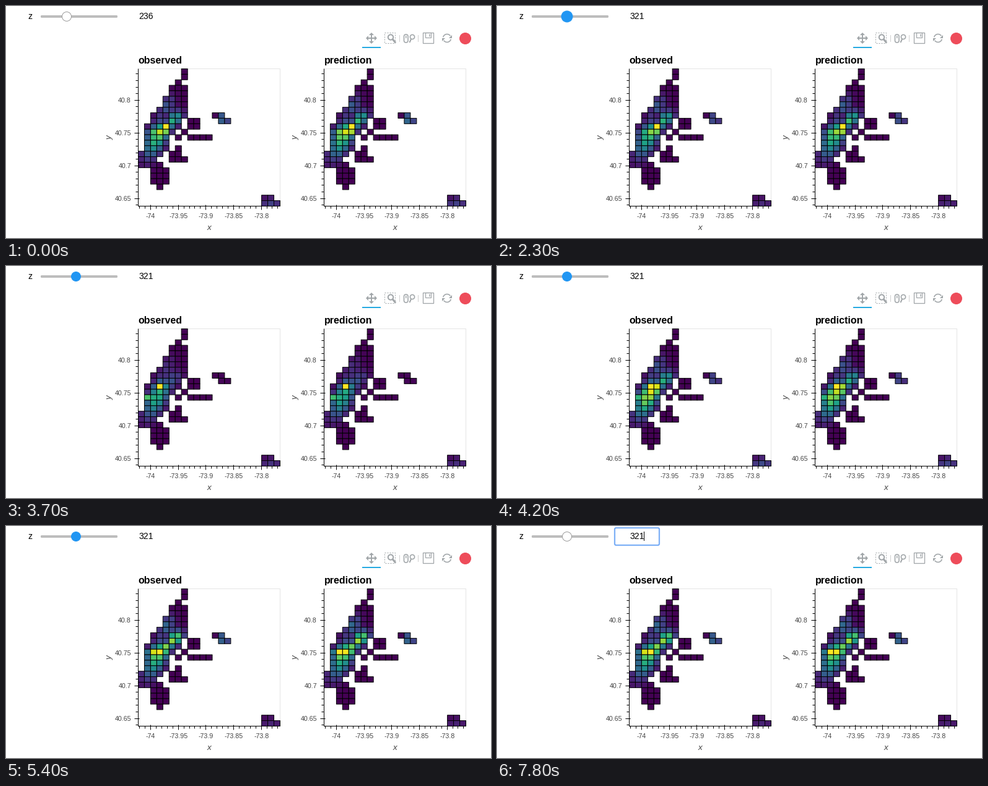
A matplotlib script that plays this animation: 783x375 px, repeating every 8000 ms.

```python
import numpy as np
import matplotlib.pyplot as plt
from matplotlib.animation import FuncAnimation
from matplotlib.collections import PolyCollection
from matplotlib.patches import Arc, Circle, FancyBboxPatch, Polygon, Rectangle

W, H, DPI = 783, 375, 96
PX = 72 / DPI
STEP_MS, LOOP_MS = 100, 8000
LEFT, TOP, RIGHT, BOTTOM = 213.5, 101.5, 442.5, 323.5
CW, CH = (RIGHT - LEFT) / 23, (BOTTOM - TOP) / 25
ICON, BLUE = "#a1a6a9", "#2196f3"

plt.rcParams.update({"font.family": "Liberation Sans", "path.snap": False})
fig = plt.figure(figsize=(W / DPI, H / DPI), dpi=DPI, facecolor="white")
ax = fig.add_axes([0, 0, 1, 1])
ax.set_xlim(0, W)
ax.set_ylim(H, 0)
ax.axis("off")


# ---- pickup counts on the map grid -------------------------------------

def map_cells():
    """Slanted island plus rectangular blocks (first row, last row, columns)."""
    cells = set()
    for r in range(15):
        left = 7 - min(6, int(.6 * r + .3))
        right = 7 - int(np.clip(round(.7 * (r - 8)), 0, 3))
        cells |= {(r, c) for c in range(left, right + 1)}
    blocks = [(15, 17, 0, 3), (18, 20, 2, 4), (21, 21, 3, 3),
              (8, 8, 12, 13), (9, 9, 13, 14), (9, 10, 8, 9), (11, 11, 7, 7),
              (12, 12, 6, 6), (12, 12, 8, 11), (14, 14, 6, 6), (15, 16, 5, 6),
              (16, 16, 7, 7), (23, 24, 20, 21), (24, 24, 22, 22)]
    for r0, r1, c0, c1 in blocks:
        cells |= {(r, c) for r in range(r0, r1 + 1) for c in range(c0, c1 + 1)}
    return sorted(cells - {(2, 7), (16, 3)})


CELLS = map_cells()
ROW, COL = np.array(CELLS, float).T
SLANT = .35

# name: row, column, row spread, column spread, usual strength
SPOTS = dict(
    core=(12, 2.6, 2.4, 1.1, 66),
    grand=(10.3, 4, .8, .45, 55),
    penn=(11, 2.1, .6, .9, 25),
    east=(8.5, 5.5, .9, .8, 50),
    park=(8.7, 4, .6, .5, -34),
    north=(6, 4.2, 1.2, .7, 22),
    theatre=(10, 3, .5, .5, 0),
    west=(12, 1, .4, .5, 0),
    inner_airport=(8.3, 13.6, .7, .6, 55),
    outer_airport=(24, 21, .8, 1.2, 18),
)


def field(**strengths):
    total = np.zeros(len(CELLS))
    for name, (r, c, sr, sc, usual) in SPOTS.items():
        dr = ROW - r
        dc = COL - c + SLANT * dr
        bump = np.exp(-.5 * ((dr / sr) ** 2 + (dc / sc) ** 2))
        total += strengths.get(name, usual) * bump
    return np.maximum(total, 0)


late_evening = field()
evening = field(core=56, penn=18, inner_airport=38, outer_airport=10)
morning = field(core=64, penn=38, east=72, north=30,
                inner_airport=30, outer_airport=9)
night = field(core=62, grand=0, penn=0, east=16, park=-12, north=10,
              theatre=55, west=48, inner_airport=3, outer_airport=14)
afternoon = field(core=60, penn=18, east=60, outer_airport=18)
rush = field(core=64, grand=30, penn=46, east=78, north=28, outer_airport=9)

KNOTS = [1900, 2300, 2900, 3700, 4700, 5400]
HOURS = [late_evening, evening, morning, night, afternoon, rush]
REDRAWS = [0, 2000, 2100, 2200, 2300, 2400, 2600, 2900, 3200, 3400, 3700,
           3900, 4200, 4700, 4900, 5100, 5400]
MODEL_ERROR = np.random.default_rng(4).uniform(.92, 1.08, len(CELLS))


def levels_at(t):
    t = max(r for r in REDRAWS if r <= t)
    pos = np.interp(t, KNOTS, range(len(KNOTS)))
    i = min(int(pos), len(HOURS) - 2)
    seen = HOURS[i] + (pos - i) * (HOURS[i + 1] - HOURS[i])
    return [100 * v / v.max() for v in (seen, seen * MODEL_ERROR)]


# ---- drawing helpers ----------------------------------------------------

def line(xs, ys, color="black", width=1, **kw):
    kw.setdefault("solid_capstyle", "butt")
    return ax.plot(xs, ys, color=color, lw=width * PX, **kw)[0]


def label(x, y, s, size, color="#444444", **kw):
    return ax.text(x, y, s, fontsize=size, color=color, **kw)


def box(x0, y0, x1, y1, edge=ICON, face="none", width=1, **kw):
    return ax.add_patch(Rectangle((x0, y0), x1 - x0, y1 - y0, ec=edge,
                                  fc=face, lw=width * PX, **kw))


def ring(x, y, r, edge=ICON, face="none", width=1, **kw):
    return ax.add_patch(Circle((x, y), r, ec=edge, fc=face, lw=width * PX,
                               **kw))


def rounded(x0, y0, x1, y1, r, edge="none", face="none", width=1, **kw):
    style = f"round,pad=0,rounding_size={r}"
    return ax.add_patch(FancyBboxPatch((x0, y0), x1 - x0, y1 - y0,
                                       boxstyle=style, ec=edge, fc=face,
                                       lw=width * PX, **kw))


def pixel(v):
    return np.floor(v) + .5


# ---- plots --------------------------------------------------------------

def draw_plot(dx, title):
    x0, x1 = LEFT + dx, RIGHT + dx
    box(x0, TOP, x1, BOTTOM, edge="#e5e5e5")
    quads = []
    for r, c in CELLS:
        x, y = x0 + c * CW, TOP + r * CH
        quads.append([(x, y), (x + CW, y), (x + CW, y + CH), (x, y + CH)])
    cells = PolyCollection(quads, cmap="viridis", edgecolors="black",
                           linewidths=PX, zorder=3)
    cells.set_clim(0, 100)
    ax.add_collection(cells)

    line([x0, x0], [TOP, BOTTOM + .5], zorder=4)
    line([x0 - .5, x1], [BOTTOM, BOTTOM], zorder=4)
    for k in range(-2, 24):
        x = pixel(233.5 + dx + k * 8.93)
        if x0 <= x <= x1:
            major = k % 5 == 0
            line([x, x], [BOTTOM - 2 * major, BOTTOM + (6 if major else 4)],
                 zorder=4)
            if major:
                label(x, 343, f"{-74 + k / 100:g}", 8, ha="center")
    for k in range(-5, 18):
        y = pixel(152.3 + k * 10.59)
        if TOP <= y <= BOTTOM:
            major = k % 5 == 0
            line([x0 - (6 if major else 4), x0 + 2 * major], [y, y], zorder=4)
            if major:
                label(x0 - 11.5, y + 3.5, f"{40.8 - k / 100:g}", 8, ha="right")

    label(x0, 93, title, 12, "black", weight="bold")
    label(x0 + 114.5, 362, "x", 10, style="italic", ha="center")
    label(x0 - 45.5, 212.5, "y", 10, style="italic", rotation=90,
          ha="center", va="center")
    return cells


maps = [draw_plot(0, "observed"), draw_plot(300, "prediction")]


# ---- toolbar ------------------------------------------------------------

def triangle(*points):
    ax.add_patch(Polygon(points, closed=True, fc=ICON, ec="none"))


def draw_toolbar():
    # pan
    cx, cy = 590, 52
    line([cx - 6, cx + 6], [cy, cy], ICON, 2)
    line([cx, cx], [cy - 6, cy + 6], ICON, 2)
    for s in (-1, 1):
        triangle((cx + 9 * s, cy), (cx + 5 * s, cy - 4), (cx + 5 * s, cy + 4))
        triangle((cx, cy + 9 * s), (cx - 4, cy + 5 * s), (cx + 4, cy + 5 * s))
    line([575, 605], [67, 67], "#26aae1", 2)

    # box zoom
    box(611.5, 43.5, 628.5, 60.5, width=1, ls=(0, (2, 2)))
    ring(621, 50.5, 4.2, face="white", width=2)
    line([624, 629], [53.5, 59.5], ICON, 3)

    for x in (635.5, 665.5):
        line([x, x], [47, 58], "#d0d0d0")

    # wheel zoom
    rounded(642.5, 46, 649, 59, 3.2, edge=ICON, width=1.6)
    line([645.8, 645.8], [48, 52], ICON, 1.5)
    ring(656, 50, 3.6, width=1.6)
    line([654, 651.5], [53.5, 59], ICON, 2)

    # save
    box(673.5, 43.5, 690.5, 60.5, width=1.3)
    box(677.5, 43.5, 686.5, 51.5, width=1.2)
    line([684, 684], [45.5, 49.5], ICON, 1.5)

    # reset
    for a in (15, 195):
        ax.add_patch(Arc((712, 52), 13, 13, theta1=a, theta2=a + 130,
                         color=ICON, lw=1.6 * PX))
    triangle((720, 47), (720, 52), (715, 52))
    triangle((704, 57), (704, 52), (709, 52))

    ring(741.5, 52.5, 9.5, edge="none", face="#ee4c5a")


draw_toolbar()


# ---- slider -------------------------------------------------------------

label(35, 21, "z", 10.5, "black")
rounded(56, 15, 180, 19, 1.5, face="#bdbdbd")
knob = ring(98, 17, 7.5, zorder=5)
entry = [rounded(190, 3, 262, 31, 2.5, edge="#a9cbfb", width=2.4),
         rounded(190, 3, 262, 31, 2, edge="#64a0f4", width=1.2)]
readout = label(226.3, 21, "236", 10.5, "black", ha="center")
caret = line([237.5, 237.5], [9, 24], "black", 1, zorder=6)


def draw(frame):
    t = frame * STEP_MS
    x = round(np.interp(t, [1800, 2300], [98, 113]))
    knob.center = (x, 17)
    readout.set_text(str(236 + round((x - 98) * 85 / 15)))
    lit, dragging = 1300 <= t < 7200, 1800 <= t < 2400
    knob.set_facecolor(BLUE if lit else "white")
    knob.set_edgecolor(BLUE if lit else "#9e9e9e")
    knob.set_radius(9 if dragging else 7.5)

    editing = t >= 7200
    for part in entry:
        part.set_visible(editing)
    caret.set_visible(editing and t != 7700)
    cx = 237.5 if t >= 7800 else 229.5
    caret.set_xdata([cx, cx])

    for cells, level in zip(maps, levels_at(t)):
        cells.set_array(level)
    return [knob, readout, caret, *entry, *maps]


anim = FuncAnimation(fig, draw, frames=LOOP_MS // STEP_MS, interval=STEP_MS,
                     init_func=lambda: draw(0), repeat=True, repeat_delay=0)
plt.show()
```
